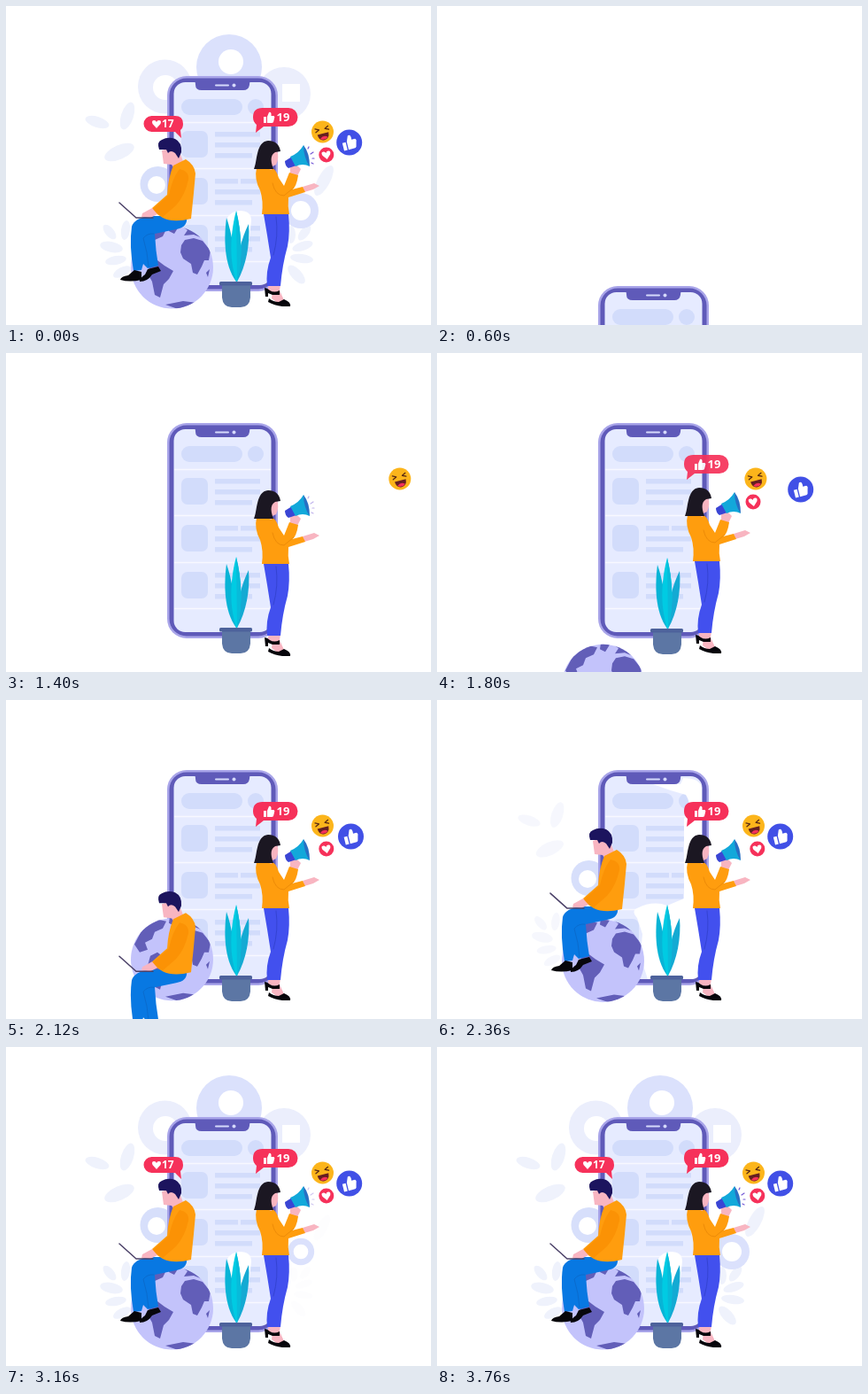
An HTML page that plays this animation: 480 by 360 pixels, repeating every 4640 ms.

```html
<!DOCTYPE html>
<html lang="en">
<head>
<meta charset="utf-8">
<title>Social media marketing</title>
<style>
html, body { margin: 0; width: 100%; height: 100%; overflow: hidden; background: #fff }
svg { display: block; width: 100vw; height: 100vh }
.pop { transform-box: fill-box; transform-origin: center }
text { font: 700 13px "Open Sans", "Noto Sans", sans-serif; fill: #fff }
.line { fill: none; stroke-linecap: round; stroke-linejoin: round }
</style>
</head>
<body>
<svg viewBox="0 0 480 360">
  <defs>
    <path id="thumb" d="M-6-1h3v7h-3zM-2-1L0-6Q3-7 2.5-2H5.5Q7-1 6 1L5 5Q4.5 6 3 6H-2z" fill="#fff"/>
    <path id="heart" d="M0 5L-4.500 0Q-6-4-2.700-4Q-.6-4 0-2Q.6-4 2.700-4Q6-4 4.500 0z" fill="#fff"/>
    <clipPath id="disc"><circle cx="187.500" cy="295" r="46.500"/></clipPath>
  </defs>

  <g id="leavesL" class="pop" fill="#eff2fc">
    <ellipse cx="103" cy="131" rx="14" ry="6" transform="rotate(18 103 131)"/>
    <ellipse cx="137" cy="124" rx="7" ry="16" transform="rotate(18 137 124)"/>
    <ellipse cx="128" cy="165" rx="18" ry="8" transform="rotate(-24 128 165)"/>
    <ellipse cx="117" cy="255" rx="10" ry="5" transform="rotate(50 117 255)"/>
    <ellipse cx="135" cy="253" rx="5" ry="11" transform="rotate(8 135 253)"/>
    <ellipse cx="119" cy="272" rx="13" ry="6" transform="rotate(12 119 272)"/>
    <ellipse cx="124" cy="287" rx="12" ry="5" transform="rotate(-10 124 287)"/>
    <ellipse cx="131" cy="300" rx="11" ry="5" transform="rotate(-28 131 300)"/>
  </g>
  <g id="leavesR" class="pop" fill="#eff2fc">
    <ellipse cx="359" cy="197" rx="7" ry="19" transform="rotate(28 359 197)"/>
    <ellipse cx="322" cy="258" rx="5" ry="10"/>
    <ellipse cx="337" cy="256" rx="10" ry="5" transform="rotate(-52 337 256)"/>
    <ellipse cx="335" cy="271" rx="12" ry="5" transform="rotate(-18 335 271)"/>
    <ellipse cx="334" cy="285" rx="13" ry="5" transform="rotate(8 334 285)"/>
    <ellipse cx="328" cy="303" rx="13" ry="6" transform="rotate(48 328 303)"/>
  </g>
  <g id="badgeA" class="pop"><circle cx="179.500" cy="91" r="30.500" fill="#ebeefc"/><circle cx="180" cy="92" r="14" fill="#fff"/></g>
  <g id="badgeB" class="pop"><circle cx="314" cy="99" r="30" fill="#ebeefc"/><rect x="312" y="88" width="20" height="20" fill="#fff"/></g>
  <g id="badgeC" class="pop"><circle cx="252" cy="69" r="37" fill="#dbe1fc"/><circle cx="254" cy="63" r="14" fill="#fff"/></g>
  <g id="badgeD" class="pop"><circle cx="171.500" cy="201" r="20" fill="#d7dffb"/><circle cx="170" cy="202" r="10" fill="#fff"/></g>
  <g id="badgeE" class="pop"><circle cx="333" cy="231" r="20" fill="#dbe1fc"/><circle cx="333" cy="231" r="11" fill="#fff"/></g>

  <g id="phone">
    <rect x="182" y="79" width="125" height="243" rx="22" fill="#a9a5e9"/>
    <rect x="184.500" y="81.500" width="120" height="238" rx="19.500" fill="#5f5ab9"/>
    <rect x="189.500" y="86" width="110" height="229" rx="13" fill="#e6ebff"/>
    <path d="M212 84H277Q275 85 275 89Q274 95 268 95H221Q214 95 214 89Q214 85 212 84z" fill="#5f5ab9"/>
    <path d="M237 89.500h14" class="line" stroke="#d5d9fb" stroke-width="2"/>
    <circle cx="257.500" cy="89.500" r="2" fill="#d5d9fb"/>
    <g fill="#d2dcfb">
      <rect x="198" y="105" width="69" height="18" rx="9"/>
      <circle cx="282" cy="114" r="9"/>
      <g id="rows"></g>
    </g>
    <path d="M190 131.500h109m-109 52h109m-109 53h109m-109 52h109" stroke="#f7f8ff" stroke-width="1.300"/>
  </g>
  <path id="patch" d="M244 95H275L278 88Q298 88 299 100V301Q299 315 286 315H238Q228 290 232 264L226 246Q219 238 226 235Q244 226 260 232L279 224V134Q290 122 281 107Q262 102 244 95z" fill="#fff"/>
  <path id="glow" d="M250 239Q255 231 264 231Q277 231 277 242L275 262L266 285L255 270z" fill="#fff"/>

  <g id="globe">
    <circle cx="187.500" cy="295" r="46.500" fill="#c3c3fb"/>
    <g clip-path="url(#disc)" fill="#625eb8">
      <path d="M198 270L202 264L212 262L222 265L231 276L229 287L224 287L221 294L216 303L211 301L209 291L200 285L197 278z"/>
      <path d="M201 259L205 253L198 248H212L231 268L222 262L212 258z"/>
      <path d="M145 278L155 259L172 250L181 252L177 260L168 264L165 272L157 276L160 284L151 287z"/>
      <path d="M163 291L171 287L179 293L189 299L184 308L178 314L174 329L168 326L165 311L160 302z"/>
      <path d="M185 247L195 249L190 257L184 254zM226 301L230 297L228 306zM180 337L200 333L216 335L200 344z"/>
    </g>
  </g>

  <g id="plant">
    <path d="M260 311C246 292 246 262 249 239C255 256 259 280 261 311z" fill="#08b4d6"/>
    <path d="M260 311C260 284 266 262 274 246C276 268 271 294 261 311z" fill="#14aad3"/>
    <path d="M260 311C251 282 254 254 260 231C266 256 268 283 261 311z" fill="#00cbe3"/>
    <path d="M260 231C266 256 268 283 261 311z" fill="#08bbda"/>
    <path d="M244 314H276V329Q275 340 265 340H255Q245 340 244 329z" fill="#5c76a4"/>
    <rect x="241" y="311" width="37" height="4.500" rx="1.500" fill="#4d629b"/>
  </g>

  <g id="man">
    <path d="M163 237H204Q206 250 192 252L168 257Q169 276 172 293L160 296L155 291L153 298L144 299Q139 270 142 249Q145 239 163 237z" fill="#0878e2"/>
    <path d="M167 257Q160 256 155 262Q160 278 161 294" class="line" stroke="#0a6bcd"/>
    <path d="M145 298L153 300L153 309Q140 312 129 309Q130 305 138 304zM160 297L172 294L175 299L165 303Q160 311 151 311Q150 308 157 303z" fill="#07060b"/>
    <path d="M176 163L193 158L200 175L189 182L187 179L178 178z" fill="#f8b5c1"/>
    <path d="M173 162Q170 153 176 151Q183 147 191 150Q199 154 198 165L195 172L191 166Q186 162 183 166L181 162z" fill="#1c145e"/>
    <path d="M189 180L203 173Q213 179 214 189Q212 213 209 240Q189 245 177 239L166 232L165 228L182 213Q183 194 189 180z" fill="#ff9d0e"/>
    <path d="M196 184Q207 186 206 196Q202 214 192 225L177 238L165 230L184 213Q188 194 196 184z" fill="#fb9205"/>
    <path d="M165 228L171 235L163 239L153 238L154 234z" fill="#f8b5c1"/>
    <path d="M128 222L147 239H166" class="line" stroke="#4b4168" stroke-width="1.500"/>
  </g>

  <g id="woman">
    <path d="M297 314H310L309 321L314 332L308 336L300 330L301 322L295 322z" fill="#f8b5c1"/>
    <path d="M292 318Q295 318 298 321Q303 324 309 321L309 326H301L296 324V328H293zM297 330Q302 334 308 334L314 331Q322 334 321 339H312Q303 338 296 334z" fill="#07060b"/>
    <path d="M291 235H319Q321 255 318 271Q312 292 310 316H295Q293 300 299 284Q295 258 291 235z" fill="#4250ee"/>
    <path d="M305 238Q308 260 302 281" class="line" stroke="#3443d2"/>
    <path d="M335 204L348 200L354 203L347 207L337 210z" fill="#f8b5c1"/>
    <path d="M321 182L328 179L333 184L329 192L321 190z" fill="#f8b5c1"/>
    <path d="M283 183Q291 181 301 183Q306 186 308 194L314 203L320 188L330 191Q328 205 323 207L335 204L338 210L319 216Q318 226 320 235H289Q291 220 287 208Q280 195 283 183z" fill="#ff9d0e"/>
    <path d="M301 200Q304 214 314 214L325 205" class="line" stroke="#ed8b08"/>
    <path d="M296 165L306 162Q309 172 305 179L301 181L300 185L294 183z" fill="#f8b5c1"/>
    <path d="M280 184C284 176 282 153 296 152C305 152 309 157 310 164L304 165C297 169 300 178 302 184Q290 184 280 184z" fill="#1b1722"/>
    <path d="M315 175L323 170L328 180L319 183Q315 180 315 175z" fill="#3a45d4"/>
    <path d="M321 170Q331 166 336 157L343 181Q335 177 327 181z" fill="#12a8da"/>
    <path d="M336 157Q343 166 343 181Q336 171 336 157z" fill="#2870c4"/>
    <path id="rays" d="M341 161l1-2M344 167l3-2M346 172h2M345 177l2 1" class="line" stroke="#7458d6" stroke-width="1.200"/>
  </g>

  <g id="likes">
    <path d="M289.500 115H319A10.500 10.500 0 0 1 319 136H291L282 143L283 134Q279 131 279 125.500Q279 115 289.500 115z" fill="#f6315a"/>
    <use href="#thumb" x="297" y="126"/><text x="305.500" y="129.500">19</text>
  </g>
  <g id="loves" class="pop">
    <path d="M164.500 124H191Q200 124 200 133Q200 138 197 140L198 149L191 142H164.500A9 9 0 0 1 164.500 124z" fill="#f6315a"/>
    <use href="#heart" x="170" y="133"/><text x="176" y="137" style="font-size:12px">17</text>
  </g>

  <g id="laugh">
    <circle cx="357.500" cy="142" r="12.500" fill="#fcb51b"/>
    <g transform="rotate(-14 357.500 142)">
      <path d="M350 137l4 2-4 2M365 137l-4 2 4 2" class="line" stroke="#5a2b13" stroke-width="1.300"/>
      <path d="M351 144H364Q363.500 151.500 357.500 151.500Q351.500 151.500 351 144z" fill="#641f20"/>
      <path d="M353 149Q358 145 362 149Q358 153 353 149z" fill="#f6315a"/>
    </g>
  </g>
  <g id="love"><circle cx="361.800" cy="168" r="8.500" fill="#f6315a"/><use href="#heart" transform="translate(361.800 168) rotate(-10)"/></g>
  <g id="like">
    <circle cx="387.700" cy="154" r="14.500" fill="#4150e6"/>
    <use href="#thumb" transform="translate(387.700 154) rotate(-14) scale(1.300)"/>
  </g>
</svg>
<script>
const LOOP = 4640, STEP = 40;
const $ = id => document.getElementById(id);

// Three feed rows on the phone screen
$('rows').innerHTML = [141, 194, 247].map((y, i) => {
  const bar = (x, dy, w) => `<rect x="${x}" y="${y + dy}" width="${w}" height="5.500"/>`;
  const top = i == 1 ? bar(236, 1, 26) + bar(265, 1, 22) : bar(236, 1, 51);
  return `<rect x="198" y="${y}" width="30" height="30" rx="7"/>` + top + bar(236, 13, 51) + bar(236, 25, 42);
}).join('');

// Springy entrance: [ms since start, remaining distance]
const spring = [[0, 281], [40, 237], [140, 100], [280, -19], [480, 5], [600, -2], [680, 0]];
const slope = (i, j) => (spring[j][1] - spring[i][1]) / (spring[j][0] - spring[i][0]);
function tangent(i) {
  if (!i) return slope(0, 1);
  if (i == spring.length - 1) return 0;
  return slope(i - 1, i) * slope(i, i + 1) > 0 ? slope(i - 1, i + 1) : 0;
}
function remaining(ms) {
  if (ms < 0) return 1;
  const i = spring.findIndex(k => k[0] > ms) - 1;
  if (i < 0) return 0;
  const [t0, a] = spring[i], [t1, b] = spring[i + 1], d = t1 - t0, x = (ms - t0) / d;
  const u = 1 - x;
  return (u * u * (1 + 2 * x) * a + x * u * u * d * tangent(i)
    + x * x * (3 - 2 * x) * b - x * x * u * d * tangent(i + 1)) / 281;
}
const ramp = (t, from, to) => Math.min(1, Math.max(0, (t - from) / (to - from)));
const back = x => 1 + 2.7 * (x - 1) ** 3 + 1.7 * (x - 1) ** 2;

// [id, start, dx, dy]
const slides = [
  ['phone', 560, 0, 281], ['plant', 800, 0, 130], ['woman', 944, 0, 208],
  ['laugh', 1320, 136, 0], ['love', 1440, 127, 0], ['like', 1625, 107, 0],
  ['globe', 1733, 0, 113], ['man', 1970, 0, 212]
];
// [id, start, end]
const pops = [
  ['badgeD', 2160, 2360], ['badgeA', 2360, 2680], ['badgeC', 2400, 2800], ['badgeB', 2480, 2840],
  ['loves', 2560, 2840], ['badgeE', 3080, 3440]
];

function draw(t) {
  for (const [id, start, dx, dy] of slides) {
    const r = remaining(t - start);
    $(id).setAttribute('transform', `translate(${dx * r} ${dy * r})`);
    $(id).style.opacity = t < start ? 0 : 1;
  }
  for (const [id, from, to] of pops) {
    const x = ramp(t, from, to);
    $(id).style.transform = `scale(${x ? Math.max(0, back(x)) : 0})`;
  }
  for (const [id, from, to] of [['leavesL', 2160, 2520], ['leavesR', 3120, 3600]]) {
    const x = ramp(t, from, to);
    $(id).style.opacity = x;
    $(id).style.transform = `scale(${.85 + .15 * x})`;
  }
  $('likes').style.opacity = ramp(t, 1560, 1820);
  $('rays').style.opacity = t < 1640 ? 1 - ramp(t, 1160, 1600) : ramp(t, 3000, 3480);
  $('patch').style.opacity = ramp(t, 2240, 2320) * (1 - ramp(t, 2600, 2840));
  $('glow').style.opacity = ramp(t, 2320, 2840);
}

function tick() {
  const t = Math.floor(performance.now() % LOOP / STEP) * STEP;
  draw(t < STEP ? LOOP : t);
  requestAnimationFrame(tick);
}
tick();
</script>
</body>
</html>
```
